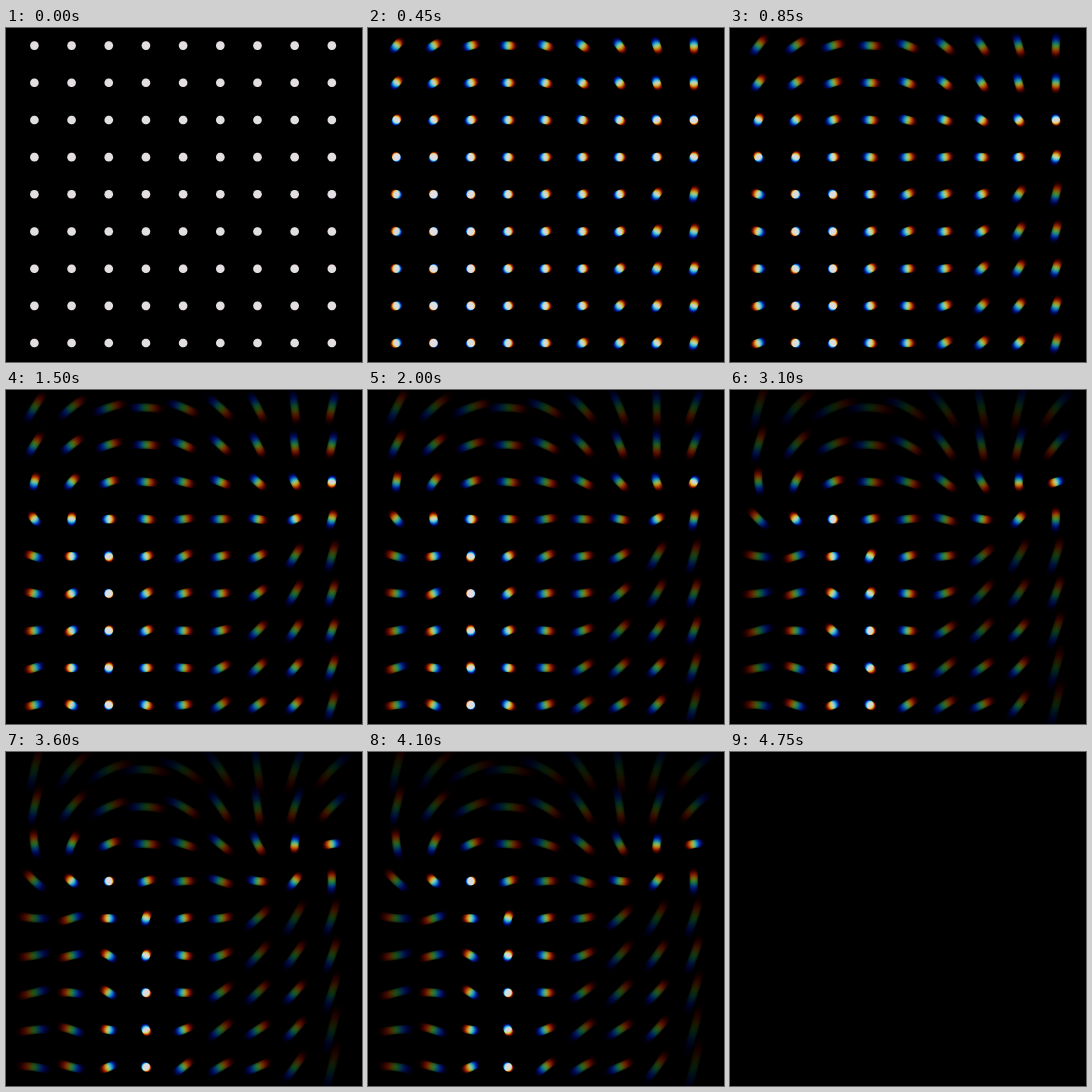
Write an HTML page with a canvas that moves like this. It is 356x334 px and loops after 4.8 s.

```html
<!DOCTYPE html>
<html>
<head>
<meta charset="utf-8">
<style>
html, body { margin: 0; height: 100%; overflow: hidden; background: #000; }
canvas { display: block; }
</style>
</head>
<body>
<canvas id="stage" width="356" height="334"></canvas>
<script>
const ctx = document.getElementById('stage').getContext('2d');
const LOOP = 4800, GAP = 37.18, LEFT = 28.4, TOP = 17.6, HALF = 14;

const clamp = (v, lo, hi) => Math.min(hi, Math.max(lo, v));
const mix = (a, b, k) => a + (b - a) * k;

// Blue, green and red bands along a trail; each channel sums to the dot's white
const offsets = Array.from({ length: 2 * HALF + 1 }, (_, i) => i / HALF - 1);
const band = centre => {
  const w = offsets.map(s => Math.exp(-(((s - centre) / 0.38) ** 2)));
  const sum = w.reduce((a, b) => a + b);
  return w.map(v => v * 224 / sum);
};
const red = band(0.45), green = band(0), blue = band(-0.45);

// An arch over the top blends into a stream that parts left and right, then climbs
function flow(x, y, phase) {
  const col = (x - LEFT) / GAP, row = (y - TOP) / GAP;
  const turn = (col - 2.9) * mix(0.3, 0.46, phase);
  const arch = 46 * clamp(1 - row / 4, 0, 1.1);
  const stream = clamp((row - 1.2) / 2.5, 0, 1);
  const climb = clamp(col / 8, 0, 1.1) ** 3;
  const part = Math.tanh((col - mix(1.4, 2.8, phase)) / 2.5);
  const ripple = 7 * Math.sin(1.7 * col + row + 2 * phase);
  return [
    arch * Math.cos(turn) + stream * 34 * part * (1 - 0.65 * climb),
    arch * Math.sin(turn) + stream * (ripple - 38 * climb)
  ];
}

function dot(x, y, n, light) {
  ctx.fillStyle = `rgb(${[red, green, blue].map(ch => Math.round(ch[n] * light))})`;
  ctx.beginPath();
  ctx.arc(x, y, 4.3, 0, 2 * Math.PI);
  ctx.fill();
}

function trail(x0, y0, phase, spread, light) {
  const reach = Math.hypot(...flow(x0, y0, phase)) * spread;
  const glow = light / (1 + (reach / 32) ** 2);
  const step = spread / (2 * HALF);
  dot(x0, y0, HALF, glow);
  for (const dir of [-1, 1]) {
    let x = x0, y = y0;
    for (let n = 1; n <= HALF; n++) {
      const [vx, vy] = flow(x, y, phase);
      x += vx * step * dir;
      y += vy * step * dir;
      dot(x, y, HALF + n * dir, glow);
    }
  }
}

function draw(t) {
  const phase = clamp((t - 600) / 2800, 0, 1);
  const spread = 1.3 * (1 - Math.exp(-t / 1900));
  const light = clamp((4740 - t) / 500, 0, 1);
  ctx.globalCompositeOperation = 'source-over';
  ctx.fillStyle = '#000';
  ctx.fillRect(0, 0, 356, 334);
  ctx.globalCompositeOperation = 'lighter';
  for (let row = 0; row < 9; row++)
    for (let col = 0; col < 9; col++)
      trail(LEFT + col * GAP, TOP + row * GAP, phase, spread, light);
}

const start = performance.now();
function tick() {
  draw((performance.now() - start) % LOOP);
  requestAnimationFrame(tick);
}
tick();
</script>
</body>
</html>
```
